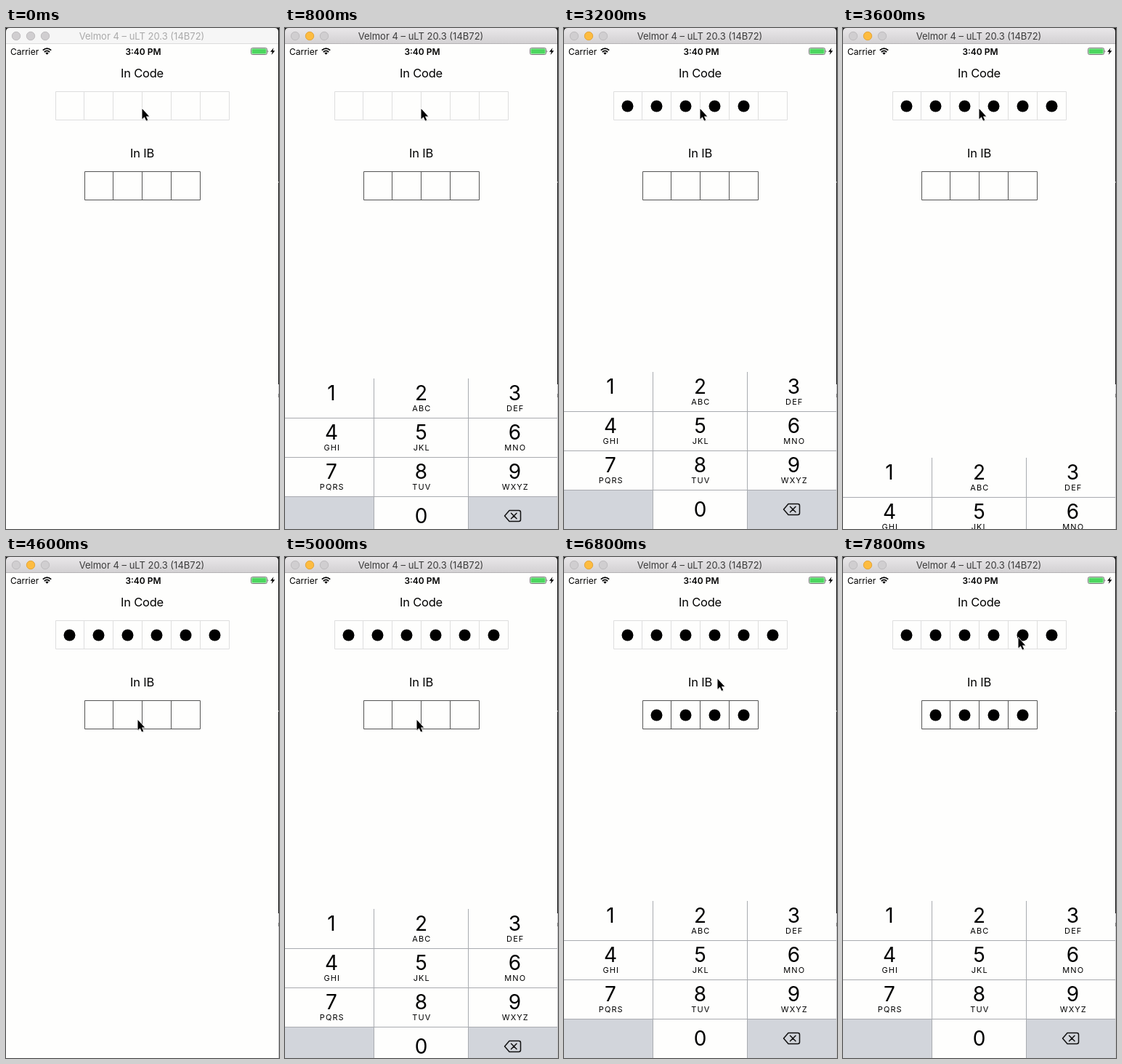
Write an HTML page that moves like this. It is 376 by 689 pixels and loops after 8000 ms.

```html
<!DOCTYPE html>
<html lang="en">
<head>
<meta charset="utf-8">
<title>Code entry</title>
<style>
  html, body { margin: 0; width: 100%; height: 100%; overflow: hidden; background: #fefefd; }
  svg { display: block; }
  text { font-family: Inter, "Open Sans", sans-serif; text-anchor: middle; }
  .label { font-size: 16.5px; letter-spacing: -.2px; }
  .digit { font-size: 28px; }
  .letters { font-size: 11px; letter-spacing: 1.1px; }
  .status { font-size: 12px; }
</style>
</head>
<body>
<svg width="376" height="689" viewBox="0 0 376 689">
  <defs>
    <linearGradient id="bar" x2="0" y2="1">
      <stop stop-color="#e9e7e9"/><stop offset="1" stop-color="#d2d0d2"/>
    </linearGradient>
  </defs>
  <rect width="376" height="689" fill="#fefefd"/>

  <rect width="376" height="8" fill="#161616"/>
  <path id="titleBar" d="M0 22V5Q0 0 5 0H370Q375 0 375 5V22Z"/>
  <path id="barLine" d="M0 21.5H375"/>
  <g stroke-width="1">
    <circle cx="14" cy="11" r="5.7" fill="#d0ced0" stroke="#bebcbe"/>
    <circle id="minimize" cx="34" cy="11" r="5.7"/>
    <circle cx="54" cy="11" r="5.7" fill="#d0ced0" stroke="#bebcbe"/>
  </g>
  <text id="title" x="187" y="16" font-size="13">Velmor 4 – uLT 20.3 (14B72)</text>

  <text class="status" x="6" y="37" style="text-anchor:start">Carrier</text>
  <g fill="none" stroke="#000" stroke-width="1.8">
    <path d="M50.8 30.6Q56.5 25.6 62.2 30.6M52.8 33Q56.5 29.8 60.2 33"/>
    <path d="M54.3 34.3Q56.5 32.6 58.7 34.3L56.5 36.8Z" fill="#000" stroke="none"/>
  </g>
  <text class="status" x="189" y="37" font-weight="600">3:40 PM</text>
  <rect x="337.5" y="27.5" width="22" height="9" rx="2" fill="#fff" stroke="#555" stroke-width=".8"/>
  <rect x="338.5" y="28.5" width="20" height="7" rx="1" fill="#4cd75f"/>
  <path d="M360.6 30.4Q362.4 32 360.6 33.8Z" fill="#555"/>
  <path d="M368.6 27.3L364 32.8H366.8L365.6 37L370.4 31.2H367.5Z"/>

  <text class="label" x="187.5" y="68">In Code</text>
  <text class="label" x="187.5" y="178">In IB</text>
  <g id="fields"></g>
  <g id="keyboard"></g>

  <path d="M375.5 8V490" stroke="#111"/>
  <path d="M375.5 490V689" stroke="#c9c9cb"/>
  <path d="M375.5 211V213M375.5 503V508" stroke="#777"/>

  <g id="cursor">
    <path d="M1 1V15.5L4.4 12.3L6.8 17.8L9.3 16.7L6.9 11.4H11.4Z" fill="#000" opacity=".18"/>
    <path d="M.5 0V14.2L3.7 11.2L6.1 16.5L8.2 15.6L5.9 10.4H10.2Z" stroke="#fff" stroke-width="1.1" paint-order="stroke"/>
  </g>
</svg>
<script>
const LOOP = 8000, STEP = 200, KEYBOARD_HEIGHT = 216;
const el = id => document.getElementById(id);

function add(parent, tag, attrs, text) {
  const node = document.createElementNS("http://www.w3.org/2000/svg", tag);
  for (const name in attrs) node.setAttribute(name, attrs[name]);
  if (text) node.textContent = text;
  return parent.appendChild(node);
}

// Returns one hidden dot for each cell.
function addField(x, y, cells, color) {
  const right = x + cells * 40 - 1;
  let path = `M${x} ${y}H${right}V${y + 39}H${x}Z`;
  for (let i = 1; i < cells; i++) path += `M${x + 40 * i - 1} ${y}v39`;
  add(el("fields"), "path", { d: path, fill: "none", stroke: color });
  return Array.from({ length: cells }, (_, i) =>
    add(el("fields"), "circle", { cx: x + 19 + 40 * i, cy: y + 20, r: 8 }));
}

function buildKeyboard() {
  const board = el("keyboard");
  const letters = ["", "ABC", "DEF", "GHI", "JKL", "MNO", "PQRS", "TUV", "WXYZ"];
  const centers = [64, 187.5, 316.5];
  add(board, "rect", { y: 473, width: 375, height: 216, fill: "#fefefd" });
  for (const [x, width] of [[0, 122], [253, 122]])
    add(board, "rect", { x, y: 635, width, height: 54, fill: "#d2d5db" });
  add(board, "path", {
    d: "M0 527.5H375M0 581.5H375M0 635.5H375M122.5 473V689M252.5 473V689",
    stroke: "#a9abb0", fill: "none"
  });
  letters.forEach((label, i) => {
    const x = centers[i % 3], y = 473 + 54 * Math.floor(i / 3);
    add(board, "text", { class: "digit", x, y: y + 30 }, String(i + 1));
    add(board, "text", { class: "letters", x: x + .8, y: y + 45 }, label);
  });
  add(board, "text", { class: "digit", x: 187.5, y: 672 }, "0");
  add(board, "path", {
    d: "M309 654.5H322Q324.5 654.5 324.5 657V667Q324.5 669.5 322 669.5H309L302.5 662ZM311.5 658.2L319 665.8M319 658.2L311.5 665.8",
    fill: "none", stroke: "#111", "stroke-width": 1.5, "stroke-linejoin": "round", "stroke-linecap": "round"
  });
}

const codeDots = addField(68.5, 87.5, 6, "#dedede");
const builderDots = addField(108.5, 197.5, 4, "#555");
buildKeyboard();

// Critically damped spring: 1 at rest, falling to 0.
function remaining(ms) {
  const phase = Math.max(0, ms) * .0183;
  return (1 + phase) * Math.exp(-phase);
}

function ease(t, start, end) {
  const p = Math.min(1, Math.max(0, (t - start) / (end - start)));
  return p * p * (3 - 2 * p);
}

function keyboardOffset(t) {
  const hidden = t < 3500 ? remaining(t - 530)
    : t < 4740 ? 1 - remaining(t - 3500)
    : remaining(t - 4740);
  return Math.round(KEYBOARD_HEIGHT * hidden);
}

function showDots(dots, t, start, interval) {
  dots.forEach((dot, i) => dot.setAttribute("visibility", t >= start + i * interval ? "visible" : "hidden"));
}

function paint(id, fill, stroke = "none") {
  el(id).setAttribute("fill", fill);
  el(id).setAttribute("stroke", stroke);
}

function draw(t) {
  const active = t >= 400;
  paint("titleBar", active ? "url(#bar)" : "#f6f6f6");
  paint("barLine", "none", active ? "#b5b3b5" : "#dcdcdc");
  paint("minimize", active ? "#fdbc40" : "#d0ced0", active ? "#e3a53a" : "#bebcbe");
  paint("title", active ? "#3c3c3c" : "#aaa");

  showDots(codeDots, t, 1800, 320);
  showDots(builderDots, t, 5200, 300);
  el("keyboard").setAttribute("transform", `translate(0 ${keyboardOffset(t)})`);

  const down = ease(t, 3800, 4400), up = ease(t, 6400, 7200);
  const x = 187 - 6 * down + 60 * up, y = 111 + 113 * down - 113 * up;
  el("cursor").setAttribute("transform", `translate(${x} ${y})`);
}

function frame() {
  const now = performance.now() + 10;
  draw(Math.floor(now % LOOP / STEP) * STEP);
  requestAnimationFrame(frame);
}
frame();
</script>
</body>
</html>
```
